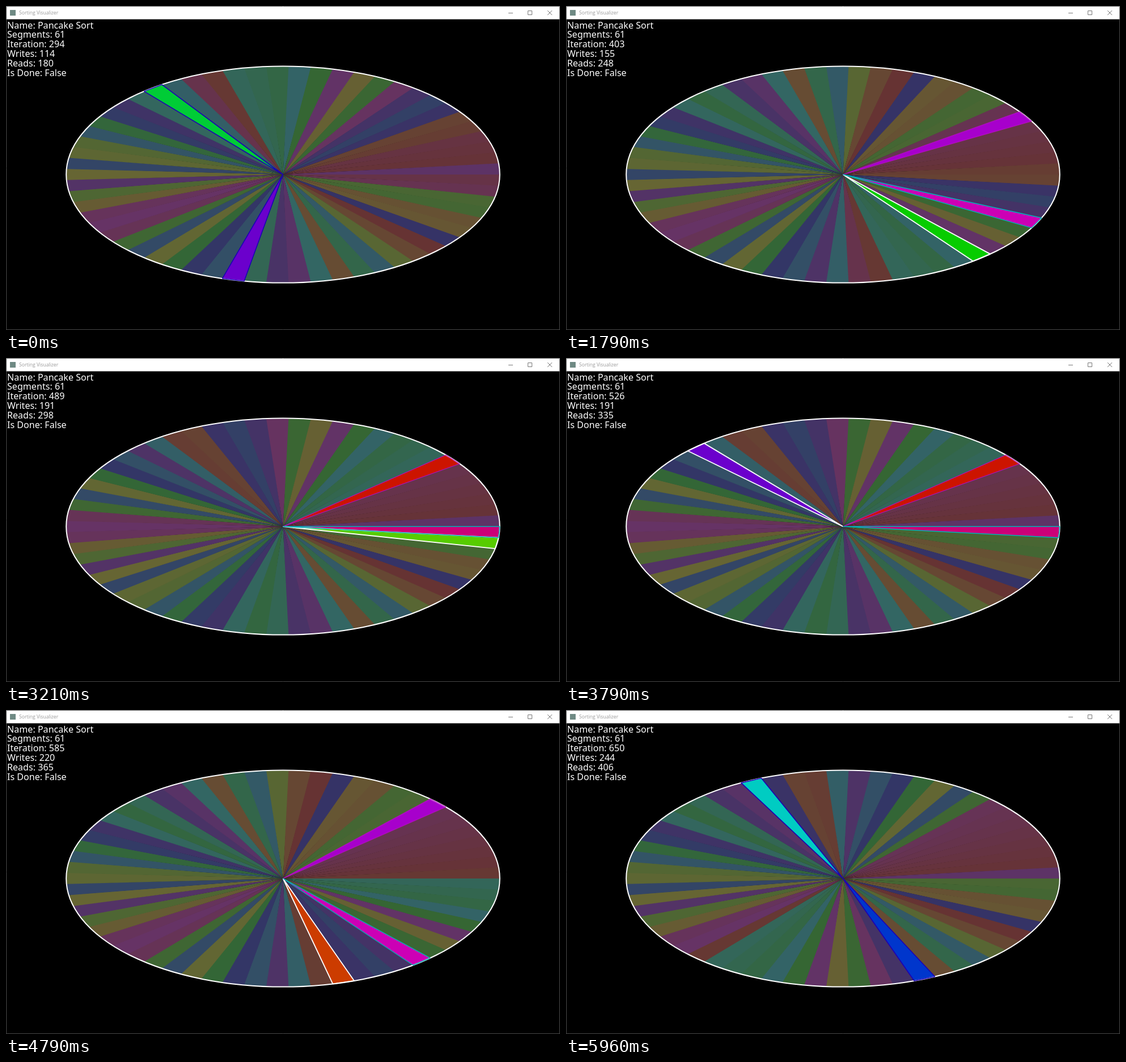
Animation, 977 px wide and 573 px high, one loop 6 s. Source, as an HTML page with a canvas:

```html
<!DOCTYPE html>
<html lang="en">
<head>
<meta charset="utf-8">
<title>Sorting Visualizer</title>
<style>
html, body { margin: 0; width: 100%; height: 100%; overflow: hidden; background: #000; }
canvas { display: block; }
</style>
</head>
<body>
<canvas id="stage" width="977" height="573"></canvas>
<script>
const ctx = document.getElementById('stage').getContext('2d');
const COUNT = 61, LOOP = 6000, FPS = 24;
const CX = 488.5, CY = 298, RX = 382.3, RY = 191.6;
const STEP = 2 * Math.PI / COUNT;

// Array in the middle of a flip of 0..58, about to swap 18 and 40
const START = [
  49, 57, 55, 16, 17, 6, 7, 41, 0, 4, 13, 33, 25, 5, 30, 48, 45, 27,
  46, 35, 40, 21, 11, 36, 18, 54, 51, 53, 8, 15, 47, 10, 37, 12, 14, 34, 22, 39, 43, 29, 23,
  32, 56, 1, 28, 26, 24, 31, 20, 50, 9, 19, 52, 44, 38, 42, 3, 2, 58, 59, 60];

// [picture number, sort step]; the sort runs at slightly uneven speed
const PACE = [[0, 0], [26, 64], [63, 159], [77, 194], [103, 263], [128, 319], [143, 356]];

function runSort() {
  const a = [...START], steps = [];
  let writes = 114, reads = 180;
  const record = marks => steps.push({ a: [...a], marks, reads, writes });

  function flip(end, i = 0) {
    for (let j = end - i; i < j; i++, j--) {
      record([[i, '#1c00b4', 1.6], [j, '#1c00b4', 1.6]]);
      [a[i], a[j]] = [a[j], a[i]];
      writes++;
    }
  }

  flip(58, 18);
  for (let end = 57; end > 53; end--) {
    let max = 0;
    for (let i = 0; i <= end; i++) {
      reads++;
      if (a[i] > a[max]) max = i;
      record([[i, '#fff', 1.8], [end, '#b40fc0', 1.2], [max, '#00b4b9', 1.4]]);
    }
    flip(max);
    flip(end);
  }
  return steps;
}

const steps = runSort();

function stepAt(ms) {
  const pic = Math.ceil((Math.floor(ms / 10) + 0.5) * FPS / 100) - 1;
  const n = Math.max(1, PACE.findIndex(p => p[0] >= pic));
  const [x0, y0] = PACE[n - 1], [x1, y1] = PACE[n];
  return steps[Math.round(y0 + (y1 - y0) * (pic - x0) / (x1 - x0))];
}

// Element 0 lies just above the right-hand axis
const slot = i => (i + COUNT - 1) % COUNT;

function wedge(pos, overlap = 0) {
  ctx.beginPath();
  ctx.moveTo(CX, CY);
  for (const t of [pos * STEP, (pos + 1) * STEP + overlap])
    ctx.lineTo(CX + RX * Math.cos(t), CY + RY * Math.sin(t));
  ctx.closePath();
}

function drawWheel({ a, marks }) {
  const lit = new Set(marks.map(m => m[0]));
  for (let pos = 0; pos < COUNT; pos++) {
    const i = (pos + 1) % COUNT, hue = a[i] * 360 / COUNT;
    ctx.fillStyle = lit.has(i) ? `hsl(${hue} 100% 40%)` : `hsl(${hue} 33.3% 30%)`;
    wedge(pos, pos < COUNT - 1 ? 0.004 : 0);
    ctx.fill();
  }
  ctx.strokeStyle = '#fff';
  ctx.lineWidth = 2;
  ctx.beginPath();
  ctx.ellipse(CX, CY, RX, RY, 0, 0, 2 * Math.PI);
  ctx.stroke();
  ctx.lineJoin = 'bevel';
  for (const [i, color, width] of marks) {
    ctx.strokeStyle = color;
    ctx.lineWidth = width;
    wedge(slot(i));
    ctx.stroke();
  }
}

function drawText({ reads, writes }) {
  ctx.fillStyle = '#fff';
  ctx.font = '16.1px "Noto Sans", "Open Sans", sans-serif';
  ['Name: Pancake Sort', `Segments: ${COUNT}`, `Iteration: ${reads + writes}`,
    `Writes: ${writes}`, `Reads: ${reads}`, 'Is Done: False']
    .forEach((line, i) => ctx.fillText(line, 2, 39.6 + 16.8 * i));
}

function drawWindow() {
  ctx.fillStyle = '#fff';
  ctx.fillRect(0, 0, 977, 23.5);
  ctx.fillStyle = '#6f8a84';
  ctx.fillRect(7, 7, 10, 10);
  ctx.fillStyle = '#999';
  ctx.font = '8.65px "Open Sans", "Noto Sans", sans-serif';
  ctx.fillText('Sorting Visualizer', 23, 15);
  ctx.strokeStyle = '#777';
  ctx.lineWidth = 1;
  ctx.strokeRect(920.5, 8.5, 7, 7);
  ctx.beginPath();
  ctx.moveTo(886, 12.5); ctx.lineTo(894, 12.5);
  ctx.moveTo(955, 8); ctx.lineTo(963, 16);
  ctx.moveTo(963, 8); ctx.lineTo(955, 16);
  ctx.stroke();
  ctx.strokeStyle = '#4a4a4a';
  ctx.strokeRect(0.5, 0.5, 976, 572);
}

function draw() {
  const step = stepAt(performance.now() % LOOP);
  ctx.fillStyle = '#000';
  ctx.fillRect(0, 0, 977, 573);
  drawWheel(step);
  drawText(step);
  drawWindow();
  requestAnimationFrame(draw);
}
draw();
</script>
</body>
</html>
```
